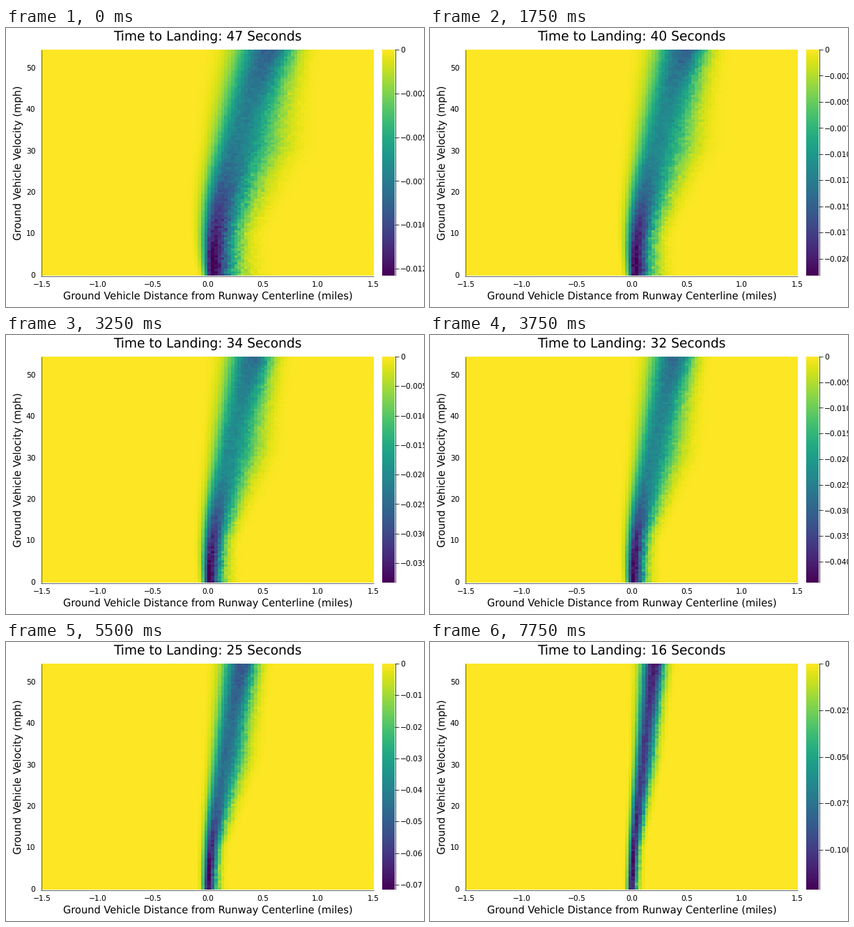
Recreate the animation shown at these times as a matplotlib script. Size 600x400 px, loop 8000 ms.

```python
import numpy as np
import matplotlib.pyplot as plt
from matplotlib.animation import FuncAnimation

W, H, DPI = 600, 400, 100
FRAMES, STEP_MS, START_S = 32, 250, 47

# plot area and colour bar, in pixels
LEFT, RIGHT, TOP, BOTTOM = 51, 528, 31, 355
BAR_L, BAR_R = 540, 558

# an even number of cells puts a cell edge on the centerline
CELLS, X_MAX, V_MAX = 100, 1.5, 54.0
X_HALF, V_HALF = X_MAX / (CELLS - 1), V_MAX / (CELLS - 1) / 2

TITLE_PX, LABEL_PX, TICK_PX = 18.67, 14.67, 10.67

# slowly varying quantities, keyed by seconds to landing
SECONDS = [16, 21, 25, 29, 34, 40, 47]
DEPTH = [.1213, .0909, .0716, .0545, .0383, .02163, .0129]
MID_LEVEL = [.83, .72, .64, .58, .52, .53, .57]
TOP_LEVEL = [.95, .83, .76, .69, .66, .69, .69]
BEND = [1.25, 1.3, 1.35, 1.4, 1.45, 1.52, 1.58]
REST_SHIFT = [0, .004, .008, .012, .02, .036, .05]

plt.rcParams["font.family"] = "DejaVu Sans"
plt.rcParams["text.hinting"] = "no_hinting"
fig = plt.figure(figsize=(W / DPI, H / DPI), dpi=DPI, facecolor="white")
ax = fig.add_axes([0, 0, 1, 1])

dist, speed = np.meshgrid(np.linspace(-X_MAX, X_MAX, CELLS),
                          np.linspace(0, V_MAX, CELLS))
u = speed / V_MAX


def at(t, values):
    return np.interp(t, SECONDS, values)


def depth(t):
    return np.exp(at(t, np.log(DEPTH)))


def by_speed(low, mid, high, hold=0):
    """Blend over u, staying at the low value up to hold."""
    return np.interp(u, [hold, .57, 1], [low, mid, high])


def risk(t, rng):
    """Relative risk (0 to 1) for every distance and speed."""
    reach = t * (.0134 - .00003 * t)
    centre = reach * u ** at(t, BEND) + at(t, REST_SHIFT) * (1 - u) ** 3
    left = by_speed(.02 + .0011 * t, .01 + .0036 * t, .025 + .0054 * t)
    right = by_speed(.035 + .155 * (t / 47) ** 2.6, .0085 * (t - 5),
                     .03 + .004 * t, hold=.18)

    mid, top = at(t, MID_LEVEL), at(t, TOP_LEVEL)
    knee = .45 + .2 * (t / 47) ** 2
    ease = (1 + np.cos(np.pi * np.minimum(u / knee, 1))) / 2
    level = mid + (1 - mid) * ease
    level += (top - mid) * np.clip((u - .65) / .35, 0, 1) ** 2

    off = dist - centre
    tail = 1.6 + .5 * np.minimum(u / .55, 1)
    shape = np.where(off < 0,
                     np.exp(-(np.abs(off) / left) ** 2.2),
                     np.exp(-(np.abs(off) / right) ** tail))
    grain = .035 + .13 * np.clip(off / right - .3, 0, 1) * (1.3 - .6 * u)
    noise = 1 + grain * rng.standard_normal(dist.shape)
    return np.clip(level * shape * noise, 0, 1)


def write(x, y, s, px, **kw):
    kw.setdefault("ha", "center")
    return ax.text(x, y, s, fontsize=px * 72 / DPI, va="baseline", **kw)


def line(xs, ys, width=.55):
    return ax.plot(xs, ys, color="black", lw=width, solid_capstyle="butt")[0]


def tick_step(low):
    """Smallest round step that needs at most nine intervals."""
    for step, digits in ((.001, 3), (.0025, 4), (.005, 3), (.01, 2), (.025, 3)):
        if low / step < 10:
            return step, digits


heat = ax.imshow(np.zeros(dist.shape), cmap="viridis", vmin=-1, vmax=0,
                 origin="lower", extent=(LEFT, RIGHT, BOTTOM, TOP),
                 interpolation="nearest", aspect="auto")
ax.imshow(np.linspace(0, -1, 256)[:, None], cmap="viridis", vmin=-1, vmax=0,
          extent=(BAR_L, BAR_R, BOTTOM, TOP), interpolation="nearest",
          aspect="auto")
ax.set_xlim(0, W)
ax.set_ylim(H, 0)
ax.axis("off")

line([50.5, 50.5], [TOP, BOTTOM + 1], .42)
line([50, RIGHT], [355.5, 355.5], .42)
line([558.5, 558.5], [TOP, BOTTOM])

for x in np.arange(-1.5, 1.6, .5):
    px = (LEFT + RIGHT) / 2 + x / (2 * X_MAX + X_HALF) * (RIGHT - LEFT)
    write(px, 371, f"{x:.1f}".replace("-", "\u2212"), TICK_PX)
for v in range(0, 51, 10):
    py = BOTTOM - (v + V_HALF) / (V_MAX + 2 * V_HALF) * (BOTTOM - TOP)
    write(42.5, py + 4.2, str(v), TICK_PX, ha="right")

write(289.5, 389, "Ground Vehicle Distance from Runway Centerline (miles)", LABEL_PX)
write(22, 193, "Ground Vehicle Velocity (mph)", LABEL_PX,
      rotation=90, rotation_mode="anchor")
title = write(289.7, 17.7, "", TITLE_PX)
bar_ticks = []


def draw_bar_ticks(low):
    while bar_ticks:
        bar_ticks.pop().remove()
    step, digits = tick_step(low)
    for k in range(int(low / step) + 1):
        y = TOP + k * step / low * (BOTTOM - TOP)
        label = f"\u2212{k * step:.{digits}f}" if k else "0"
        bar_ticks.append(line([558, 564], [y, y]))
        bar_ticks.append(write(566.2, y + 4, label, TICK_PX, ha="left"))


def update(i):
    t = START_S - i
    title.set_text(f"Time to Landing: {t} Seconds")
    heat.set_data(-risk(t, np.random.default_rng(100 + i)))
    draw_bar_ticks(depth(t))
    return [heat, title, *bar_ticks]


anim = FuncAnimation(fig, update, frames=FRAMES, interval=STEP_MS,
                     repeat=True, repeat_delay=0, blit=False)
plt.show()
```
